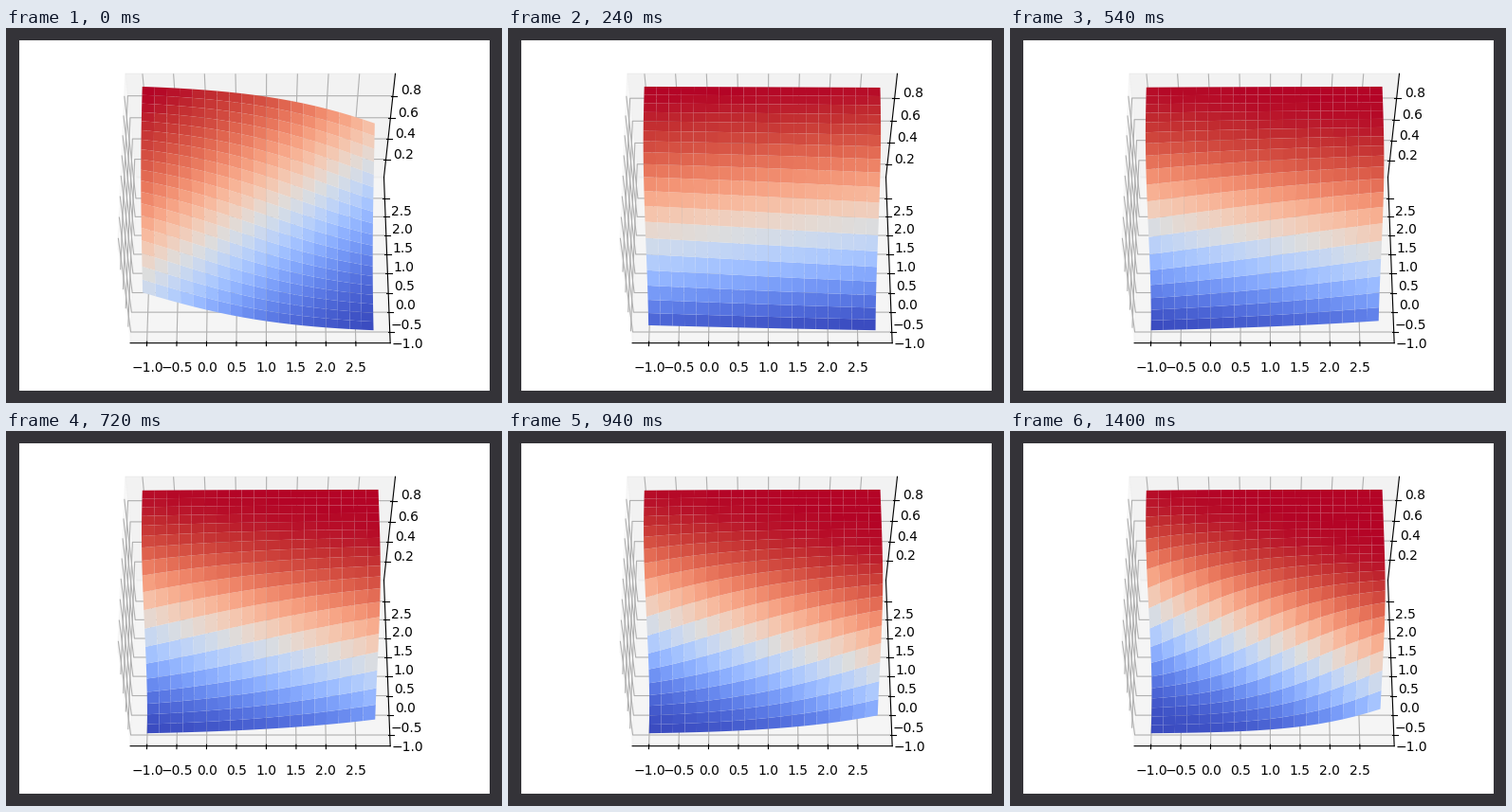
A matplotlib script for the animation above (1420 ms loop, 523x396 px).

```python
import numpy as np
import matplotlib.pyplot as plt
from matplotlib.animation import FuncAnimation
from matplotlib.patches import Rectangle

W, H, DPI = 523, 396, 100
FRAMES, INTERVAL = 71, 20
SIDE = 369.6            # square drawing area in pixels
STRETCH = 496 / SIDE    # horizontal stretch of the scene

steps = np.arange(20) * 0.2 - 1
X, Y = np.meshgrid(steps, steps)


def weights(i):
    """Weights of the classifier after i training steps."""
    s = np.log(1 + i / 10)
    w0 = -0.81 + 0.80 * s + 0.065 * s**2
    w1 = 1.02 + 0.78 * s
    bias = 0.008 - 0.17 * s - 0.25 * s**2
    return w0, w1, bias


def predict(i):
    w0, w1, bias = weights(i)
    return 1 / (1 + np.exp(-(w0 * X + w1 * Y + bias)))


def padded(lo, hi, margin=0.0):
    """Widen a range by a data margin, then by the pane border."""
    for m in (margin, 1 / 48):
        d = (hi - lo) * m
        lo, hi = lo - d, hi + d
    return lo, hi


fig = plt.figure(figsize=(W / DPI, H / DPI), dpi=DPI, facecolor="#343338")
fig.add_artist(Rectangle((14 / W, 13 / H), 496 / W, 370 / H, color="white",
                         lw=0, zorder=-1, transform=fig.transFigure))

ax = fig.add_axes([78.35 / W, 13 / H, SIDE / W, SIDE / H], projection="3d")
ax.patch.set_visible(False)
# the tiny turn keeps the upright axis on the right
ax.view_init(elev=60, azim=-90 + 1e-4)
box = np.array([STRETCH, 1, 1])
ax.set_box_aspect(box, zoom=np.linalg.norm(box) / 1.8294640721620434)
ax.tick_params(pad=1.8)

surface = None


def draw(i):
    global surface
    if surface is not None:
        surface.remove()
    Z = predict(i)
    surface = ax.plot_surface(X, Y, Z, cmap="coolwarm")
    ax.set_xticks(np.arange(-1, 3, 0.5))
    ax.set_yticks(np.arange(-1, 3, 0.5))
    ax.set_zticks([0.2, 0.4, 0.6, 0.8])
    ax.set_xlim(*padded(-1, 2.8, 0.05))
    ax.set_ylim(*padded(-1, 2.8, 0.05))
    ax.set_zlim(*padded(Z.min(), Z.max()))
    return [surface]


anim = FuncAnimation(fig, draw, frames=FRAMES, init_func=lambda: [],
                     interval=INTERVAL, repeat=True, repeat_delay=0, blit=False)

plt.show()
```
